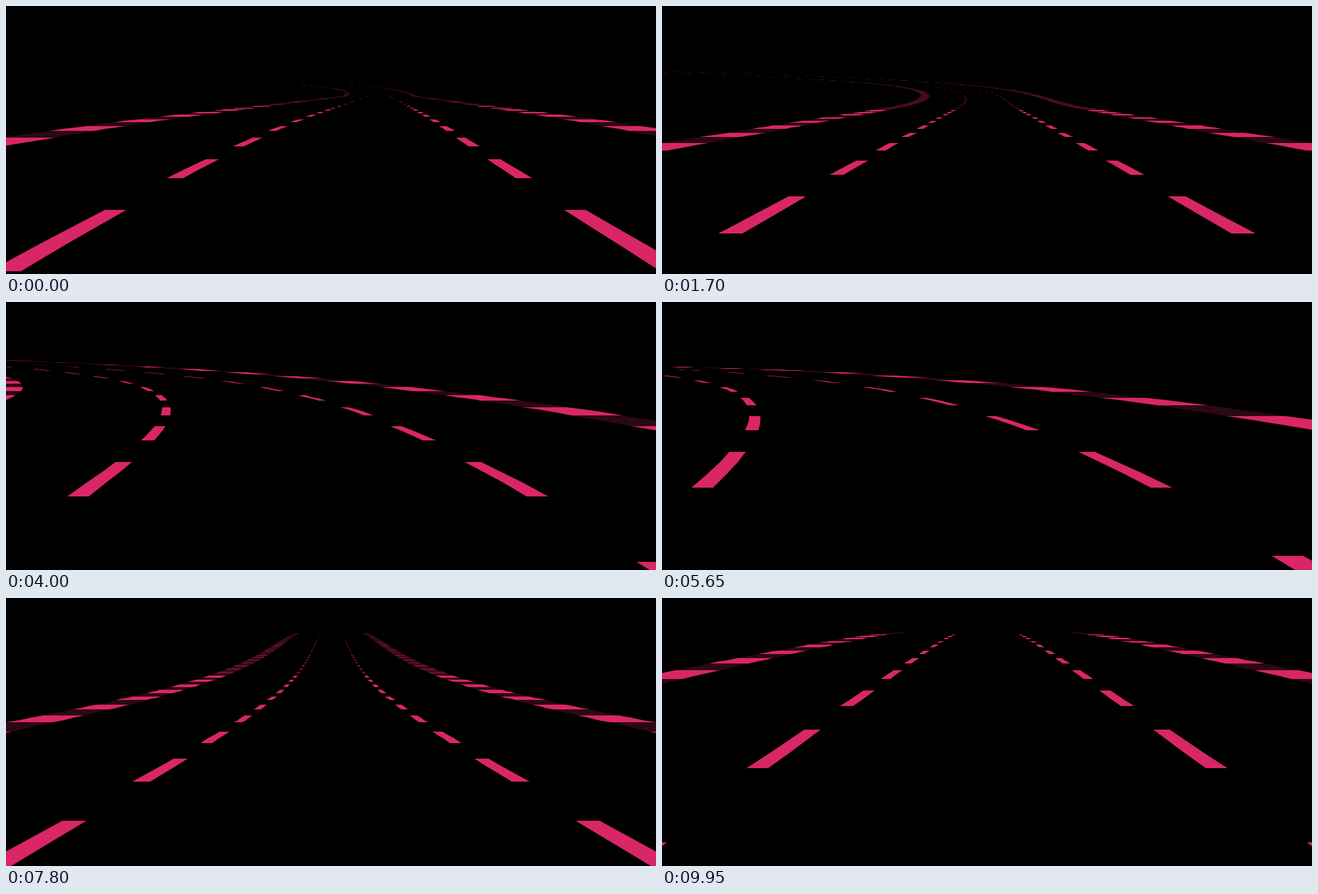
Animation of 960 by 397 pixels, one loop 10000 ms. Source, as an HTML page with a canvas:

```html
<!DOCTYPE html>
<html>
<head>
<meta charset="utf-8">
<style>
html, body { margin: 0; width: 100%; height: 100%; overflow: hidden; background: #000; }
canvas { display: block; }
</style>
</head>
<body>
<canvas id="stage" width="960" height="397"></canvas>
<script>
const ctx = document.getElementById('stage').getContext('2d');
const LOOP = 10000, STEP = 50;
const SEGMENT = 200, ROAD_WIDTH = 2000, CAMERA_HEIGHT = 1000, DRAW_DISTANCE = 300;
const DEPTH = 1 / Math.tan(50 * Math.PI / 180);
const CENTER_X = 480, HORIZON = 127;
const SCALE_X = 1152 * DEPTH, SCALE_Y = 425.5 * DEPTH;
const PLAYER_AHEAD = CAMERA_HEIGHT * DEPTH / SEGMENT;

const PINK = '#d82666', MID = '#640f2f', DIM = '#430a20', SHADE = '#2c0715';

// Sections of road: [length, curve, climb], each a third easing in, holding, easing out.
const SECTIONS = [[300, 4, 40], [150, 0, 0], [300, -4, 40], [300, 0, 60], [300, 4, -20]];
const FIRST = -300;
const ease = t => (1 - Math.cos(Math.PI * t)) / 2;

const curves = [], heights = [0];
for (const [length, curve, climb] of SECTIONS) {
  const third = length / 3, base = heights[heights.length - 1];
  for (let n = 0; n < length; n++) {
    const t = n / third;
    curves.push(curve * (t < 1 ? t * t : t < 2 ? 1 : 1 - ease(t - 2)));
    heights.push(base + climb * SEGMENT * ease(n / length));
  }
}

// Travelled segments by step of the clock: nearly constant speed.
const TRAVEL = [[0, -37], [34, 75], [80, 212], [113, 320], [138, 398], [174, 513], [199, 590]];

function travelled(tick) {
  let i = 1;
  while (tick > TRAVEL[i][0]) i++;
  const [t0, s0] = TRAVEL[i - 1], [t1, s1] = TRAVEL[i];
  return Math.round(s0 + (s1 - s0) * (tick - t0) / (t1 - t0));
}

function heightAt(s) {
  const i = Math.floor(s), f = s - i;
  return heights[i] + (heights[i + 1] - heights[i]) * f;
}

function strip(a, b, from, to, color) {
  ctx.fillStyle = color;
  ctx.beginPath();
  ctx.moveTo(a.x + a.w * from, a.y);
  ctx.lineTo(a.x + a.w * to, a.y);
  ctx.lineTo(b.x + b.w * to, b.y);
  ctx.lineTo(b.x + b.w * from, b.y);
  ctx.fill();
}

function drawSegment(a, b, index, n) {
  ctx.fillStyle = '#000';
  ctx.fillRect(0, b.y, 960, a.y - b.y);
  const light = Math.floor(index / 3) % 2 === 0;
  const color = n < 66 ? PINK : n < 150 ? MID : DIM;
  const edge = light ? color : SHADE;
  strip(a, b, -7 / 6, -1, edge);
  strip(a, b, 1, 7 / 6, edge);
  if (!light) return;
  for (const lane of [-1 / 3, 1 / 3]) strip(a, b, lane - 1 / 64, lane + 1 / 64, color);
}

function draw(time) {
  const base = travelled(Math.floor(time % LOOP / STEP)) - FIRST;
  const position = base + 0.5;
  const cameraY = heightAt(position + PLAYER_AHEAD) + CAMERA_HEIGHT;

  const project = (index, bend) => {
    const z = (index - position) * SEGMENT;
    return {
      x: CENTER_X + SCALE_X * bend / z,
      y: Math.round(HORIZON + SCALE_Y * (cameraY - heights[index]) / z),
      w: SCALE_X * ROAD_WIDTH / z
    };
  };

  ctx.fillStyle = '#000';
  ctx.fillRect(0, 0, 960, 397);
  let bend = 0, turn = -curves[base] / 2, top = Infinity;
  for (let n = 0; n < DRAW_DISTANCE; n++) {
    const index = base + n;
    if (n > 0) {
      const near = project(index, bend), far = project(index + 1, bend + turn);
      if (far.y < top && far.y < near.y) {
        drawSegment(near, far, index, n);
        top = far.y;
      }
    }
    bend += turn;
    turn += curves[index];
  }
}

const start = performance.now();
function frame() {
  draw(performance.now() - start);
  requestAnimationFrame(frame);
}
frame();
</script>
</body>
</html>
```
